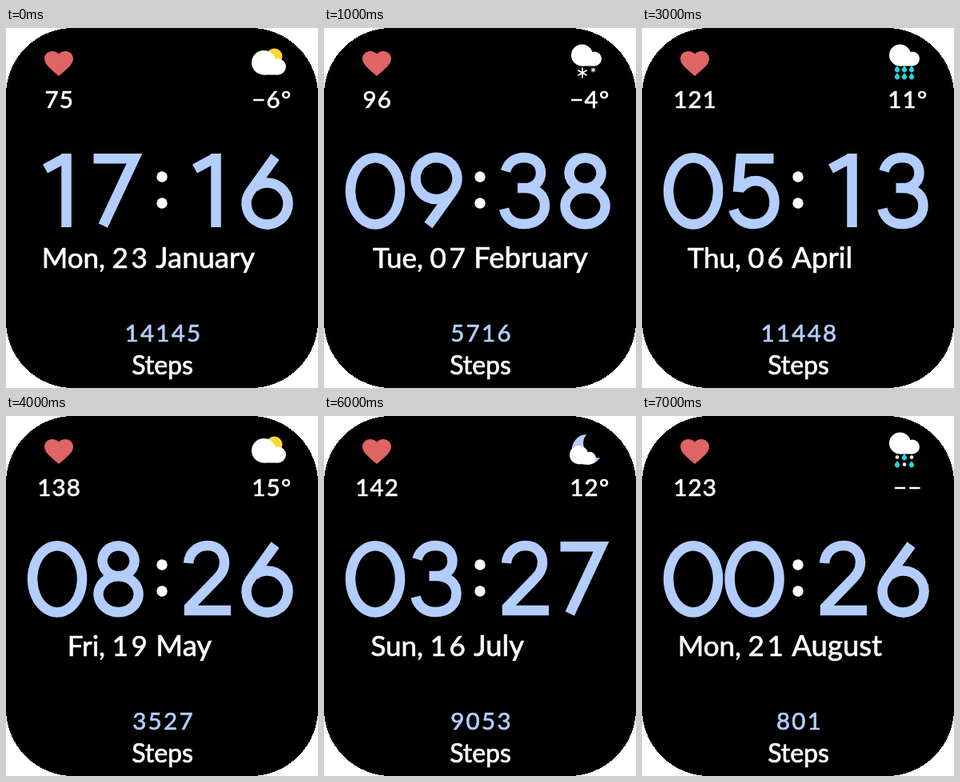
Animation, 390 px wide and 450 px high, one loop 8 s. Source, as an HTML page:

```html
<!DOCTYPE html>
<html lang="en">
<head>
<meta charset="utf-8">
<title>Watch face</title>
<style>
  html, body { margin: 0; height: 100%; overflow: hidden; background: #fff; }
  svg { display: block; width: 390px; height: 450px; font-family: Lato, sans-serif; fill: #fff; }
  text { stroke: #fff; stroke-width: .7; }
  .clock { fill: none; stroke: #b3cdff; stroke-width: 12.5; stroke-miterlimit: 8; }
  .middle { text-anchor: middle; }
  .small { font-size: 29.5px; letter-spacing: 1.2px; }
  .date { font-size: 35px; }
  .day { letter-spacing: 3.6px; }
  .month { font-size: 36.5px; }
  .steps { font-size: 29.5px; letter-spacing: 2.3px; fill: #b3cdff; stroke: #b3cdff; }
  .label { font-size: 32px; }
</style>
</head>
<body>
<svg viewBox="0 0 390 450">
  <rect width="390" height="450" rx="84" fill="#000" shape-rendering="crispEdges"/>
  <path fill="#e06464" transform="translate(44.4 23.8) scale(1.8 1.7)"
    d="M12 21.35l-1.45-1.32C5.4 15.36 2 12.28 2 8.5 2 5.42 4.42 3 7.5 3c1.74 0 3.41.81 4.5 2.09C13.09 3.81 14.76 3 16.5 3 19.58 3 22 5.42 22 8.5c0 3.78-3.4 6.86-8.55 11.54z"/>
  <circle cx="195" cy="186" r="6.7"/>
  <circle cx="195" cy="219" r="6.7"/>
  <text class="middle label" x="195.5" y="433">Steps</text>
  <g id="face"></g>
</svg>
<script>
// Clock digits as strokes: x is relative to the cell centre, y to the cap line.
const digits = {
  0: 'M0 5.2A31 41.6 0 1 0 .1 5.2Z',
  1: 'M11.5 92V0M-15 19L9 6',
  2: 'M-23 27C-22 14 -12 5 1 5C14 5 22 14 22 26C22 36 17 42 10 49L-22 82V86H30',
  3: 'M-24 22C-21 11 -12 5 -1 5C13 5 20 14 20 24C20 35 12 43 0 43H-9M0 43C15 43 25 52 25 65C25 79 14 88 -1 88C-14 88 -23 81 -26 69',
  5: 'M24 6.2H-17L-20.5 48M-19 45C-13 38 -7 34 1 34C15 34 25 45 25 61C25 77 14 88 -1 88C-13 88 -23 81 -26 70',
  6: 'M10 4L-21.3 47.6A26 26 0 1 0 0 36.5Q-9 36.5 -16 42',
  7: 'M-31 6.2H20L-19.2 90',
  8: 'M0 5.2A20 19 0 1 0 .1 5.2ZM0 43.2A25 22.5 0 1 0 .1 43.2Z',
  9: 'M-10 89.5L21.3 45.9A26 26 0 1 0 0 57Q9 57 16 51.5'
};
const cells = [64, 140.5, 251, 326.5];

const cloud = (x, y, scale) => `<g transform="translate(${x} ${y}) scale(${scale})">
  <circle cx="13.5" cy="13.5" r="13.5"/><circle cx="29" cy="18" r="9"/>
  <rect x="13.5" y="14" width="15.5" height="13"/></g>`;

const star = (x, y, r) => [0, 60, 120].map(a =>
  `<path stroke="#fff" stroke-width="${r / 4 + .3}" transform="translate(${x} ${y}) rotate(${a})" d="M0 ${-r}V${r}"/>`).join('');

const drops = mixed => [0, 1, 2, 3, 4, 5].map(i => {
  const x = 319 + i % 3 * 9, y = i < 3 ? 51.5 : 60.5;
  return mixed && i % 2 === 0
    ? `<circle cx="${x}" cy="${y}" r="2.3"/>`
    : `<path fill="#1cd9df" d="M${x} ${y - 4.5}L${x + 2.6} ${y - 1}A3.1 3.1 0 1 1 ${x - 2.6} ${y - 1}Z"/>`;
}).join('');

const weather = {
  sun: '<circle cx="335.5" cy="35.5" r="10" fill="#fdd835"/>' + cloud(307, 28, 1.13),
  moon: '<path fill="#b8cdf8" d="M328 23A19 19 0 1 0 345 52A18 18 0 0 1 328 23Z"/>' + cloud(307, 37, .86),
  snow: cloud(309, 20.5, 1) + star(323, 56, 6.5) + star(336.5, 52.5, 3),
  rain: cloud(309, 20.5, 1) + drops(false),
  sleet: cloud(309, 20.5, 1) + drops(true)
};

// time, weekday, day, month, pulse, temperature, weather, steps
const scenes = [
  ['1716', 'Mon', '23', 'January', 75, '−6°', 'sun', 14145],
  ['0938', 'Tue', '07', 'February', 96, '−4°', 'snow', 5716],
  ['0602', 'Wed', '22', 'March', 125, '−4°', 'moon', 2164],
  ['0513', 'Thu', '06', 'April', 121, '11°', 'rain', 11448],
  ['0826', 'Fri', '19', 'May', 138, '15°', 'sun', 3527],
  ['1853', 'Sat', '24', 'June', 157, '−8°', 'snow', 7187],
  ['0327', 'Sun', '16', 'July', 142, '12°', 'moon', 9053],
  ['0026', 'Mon', '21', 'August', 123, '−−', 'sleet', 801]
];

const text = (cls, x, y, value, anchor = '') =>
  `<text class="${cls}" x="${x}" y="${y}" ${anchor}>${value}</text>`;

function draw([time, weekday, day, month, pulse, temperature, sky, steps]) {
  const clock = [...time].map((d, i) =>
    `<path transform="translate(${cells[i]} 157)" d="${digits[d]}"/>`).join('');
  return `<g class="clock">${clock}</g>` + weather[sky] +
    text('middle small', 66.7, 99.5, pulse) +
    text('middle small', 332.3, 99.5, temperature) +
    text('date', 124, 300, weekday + ',', 'text-anchor="end"') +
    text('date day', 132.5, 300, day) +
    text('date month', 187.3, 300, month) +
    text('middle steps', 197, 391.5, steps);
}

const face = document.getElementById('face');
const start = performance.now();
let shown = -1;

function tick() {
  const index = Math.floor((performance.now() - start) / 1000) % scenes.length;
  if (index !== shown) face.innerHTML = draw(scenes[shown = index]);
  requestAnimationFrame(tick);
}
tick();
</script>
</body>
</html>
```
